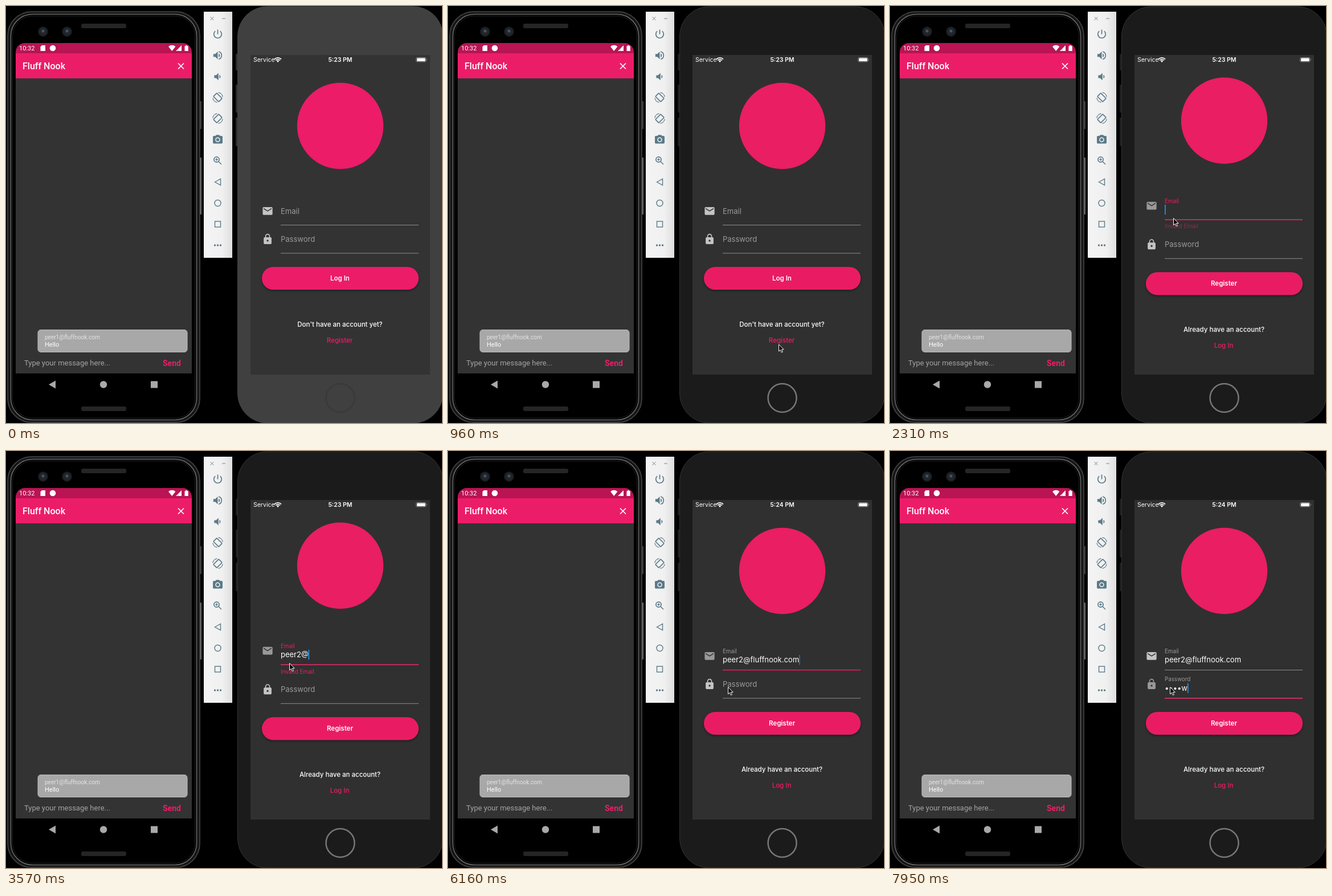
These frames come from a looping animation (765x732 px, 8 s). An HTML page:

```html
<!DOCTYPE html>
<html lang="en">
<head>
<meta charset="utf-8">
<title>Chat sign-up</title>
<style>
  html, body { margin: 0; width: 100%; height: 100%; overflow: hidden; background: #000; }
  svg { display: block; width: 765px; height: 732px; font-family: Roboto, sans-serif; }
  .ios {
    --shell: #1b1b1b; --edge: #333; --screen: #303030; --pink: #e91e63; --ring: #777; --key: #1d1d1d;
    font-family: Inter, sans-serif;
  }
  .ios.idle { --shell: #404040; --edge: #444; --screen: #333; --pink: #ec1c69; --ring: #393939; --key: #2c2c2c; }
  .pink { fill: var(--pink); }
  .screen { fill: var(--screen); }
  .mid { text-anchor: middle; }
  .small { font-size: 11.5px; }
  .field { font-size: 13px; }
  .label { fill: #9a9a9a; font-size: 13px; }
  .line { stroke: #8c8c8c; stroke-width: 1; }
  .focus { stroke: var(--pink); stroke-width: 1.6; opacity: 0; }
  .icon { fill: #c4c4c4; }
  .caret { fill: #2196f3; opacity: 0; }
  .tools { fill: #5c7a88; }
  .stroke { fill: none; stroke: #5c7a88; stroke-width: 1.7; }
</style>
</head>
<body>
<svg viewBox="0 0 765 732">
  <defs>
    <clipPath id="viewport"><rect x="429" y="86" width="315" height="561"/></clipPath>
    <linearGradient id="panel">
      <stop offset="0" stop-color="#f4f4f4"/><stop offset=".65" stop-color="#f0f0f0"/><stop offset="1" stop-color="#dedede"/>
    </linearGradient>
    <filter id="shadow" x="-5%" y="-20%" width="110%" height="150%">
      <feDropShadow dx="0" dy="2" stdDeviation="2" flood-opacity=".4"/>
    </filter>
    <path id="mail" d="M20 4H4a2 2 0 00-2 2v12a2 2 0 002 2h16a2 2 0 002-2V6a2 2 0 00-2-2zm0 4l-8 5-8-5V6l8 5 8-5z"/>
    <path id="lock" d="M18 8h-1V6a5 5 0 00-10 0v2H6a2 2 0 00-2 2v10a2 2 0 002 2h12a2 2 0 002-2V10a2 2 0 00-2-2zm-6 9a2 2 0 110-4 2 2 0 010 4zm3.1-9H8.9V6a3.1 3.1 0 016.2 0z"/>
    <g id="rotate">
      <rect x="-4.2" y="-6.6" width="8.4" height="13.2" rx="1" transform="rotate(-45)"/>
      <path d="M1 -8.6A8.6 8.6 0 0 1 8.6 -1M-1 8.6A8.6 8.6 0 0 1 -8.6 1" stroke-width="1.3"/>
    </g>
  </defs>
  <rect width="765" height="732"/>

  <!-- Android phone -->
  <rect x="340" y="167" width="3" height="49" rx="1" fill="#3b3b3b"/>
  <rect x="340" y="266" width="3" height="100" rx="1" fill="#666"/>
  <rect x="3" y="10" width="337" height="721" rx="42" fill="#161616" stroke="#4a4a4a" stroke-width="1.5"/>
  <rect x="8.5" y="14.5" width="326" height="712" rx="38" stroke="#6a6a6a" stroke-width="1.5"/>
  <rect x="11.5" y="17.5" width="320" height="706" rx="35" stroke="#222"/>
  <g fill="#252525">
    <rect x="132" y="31" width="79" height="8" rx="3"/>
    <rect x="132" y="703" width="79" height="8" rx="3"/>
  </g>
  <g fill="#20262b" stroke="#181a1c" stroke-width="2">
    <circle cx="65" cy="45" r="8"/><circle cx="107" cy="45" r="8"/>
  </g>
  <g fill="#465463"><circle cx="65" cy="44" r="2.5"/><circle cx="107" cy="44" r="2.5"/></g>
  <path d="M17 83V81a16 16 0 0116-16H310a16 16 0 0116 16v2z" fill="#b91454"/>
  <rect x="17" y="83" width="309" height="44" fill="#ec1d68"/>
  <rect x="17" y="127" width="309" height="518" fill="#333"/>
  <g fill="#fff">
    <text x="23" y="78" font-size="11">10:32</text>
    <path d="M63 69h6v10h-8.500V71.500z"/>
    <circle cx="82" cy="74" r="5.3"/>
    <path d="M285 71.300a9 9 0 0112.400 0L291.200 79zM308 69v10h-10zM313.500 70.200h1.800V69h2.600v1.200h1.800V79h-6.200z"/>
    <path d="M302 69v10" stroke="#b91454" opacity=".4"/>
    <text x="29" y="111" font-size="16" font-weight="500">Fluff Nook</text>
    <path d="M302 100.500l10 10M312 100.500l-10 10" stroke="#fff" stroke-width="1.7"/>
  </g>
  <rect x="56" y="568.500" width="262" height="39" rx="5" fill="#a8a8a8" stroke="#bdbdbd"/>
  <text x="68" y="585" font-size="10" fill="#e4e4e4">peer1@fluffnook.com</text>
  <text x="68" y="598" font-size="11" fill="#fff">Hello</text>
  <text x="32" y="631" font-size="13" fill="#a4a4a4">Type your message here...</text>
  <text x="275" y="632" font-size="14" font-weight="700" fill="#ec1d68">Send</text>
  <g fill="#a9a9a9">
    <path d="M75 664.500L87 657.500v14z"/><circle cx="171" cy="664.500" r="6.200"/><rect x="254" y="658.500" width="12" height="12"/>
  </g>

  <!-- Emulator toolbar -->
  <rect x="347" y="10" width="50" height="432" fill="url(#panel)"/>
  <path d="M358.500 19l6 6M364.500 19l-6 6M379 22h6" stroke="#78858b"/>
  <g class="tools">
    <path transform="translate(361.300 76.500) scale(.85)" d="M3 9v6h4l5 5V4L7 9zm13.500 3A4.500 4.500 0 0014 7.970v8.050A4.470 4.470 0 0016.500 12zM14 3.230v2.060a7 7 0 010 13.420v2.060a9 9 0 000-17.540z"/>
    <path transform="translate(361.300 114.200) scale(.82)" d="M5 9v6h4l5 5V4L9 9zM18.500 12A4.500 4.500 0 0016 7.970v8.050A4.500 4.500 0 0018.500 12z"/>
    <path transform="translate(361.300 224.500) scale(.85)" d="M9 2L7.170 4H4a2 2 0 00-2 2v12a2 2 0 002 2h16a2 2 0 002-2V6a2 2 0 00-2-2h-3.170L15 2zm3 15a5 5 0 110-10 5 5 0 010 10z"/>
    <circle cx="371.500" cy="234.700" r="2.700"/>
    <circle cx="366.500" cy="420" r="1.700"/><circle cx="371.500" cy="420" r="1.700"/><circle cx="376.500" cy="420" r="1.700"/>
  </g>
  <g class="stroke">
    <path d="M371.500 41.500v8M367.200 44.200a6.800 6.800 0 108.600 0"/>
    <use href="#rotate" transform="translate(371.500 160.500)"/>
    <use href="#rotate" transform="translate(371.500 197.500) scale(-1 1)"/>
    <circle cx="369.500" cy="269.500" r="4.600"/>
    <path d="M373 273l5 5M367.200 269.500h4.600M369.500 267.200v4.600" stroke-width="1.500"/>
    <path d="M366.500 309l10-5.500v11z" stroke-width="1.400"/>
    <circle cx="371.500" cy="346" r="5.500" stroke-width="1.400"/>
    <rect x="366.500" y="378" width="10" height="10" stroke-width="1.400"/>
  </g>

  <!-- iOS simulator -->
  <g class="ios" id="ios">
    <g style="fill:var(--key)">
      <rect x="403" y="84" width="5" height="29" rx="1"/><rect x="403" y="138" width="5" height="49" rx="1"/><rect x="403" y="196" width="5" height="50" rx="1"/>
    </g>
    <rect x="406.500" y="1" width="360" height="731" rx="52" style="fill:var(--shell);stroke:var(--edge)"/>
    <circle cx="586.500" cy="688" r="25" fill="none" stroke-width="2.500" style="stroke:var(--ring)"/>
    <g clip-path="url(#viewport)">
      <g id="login"></g>
      <g id="signup"></g>
      <circle id="logo" class="pink" cx="586.500" cy="210.500" r="75.700"/>
    </g>
    <g fill="#fff">
      <text x="434" y="98" font-size="10.500">Service</text>
      <path d="M471 93.300a8.500 8.500 0 0112 0M473.100 95.500a5.500 5.500 0 017.800 0" fill="none" stroke="#fff" stroke-width="1.700"/>
      <path d="M474.800 96.600a3.200 3.200 0 014.400 0L477 99z"/>
      <text id="clock" class="mid" x="586.500" y="98" font-size="10.500" font-weight="600"></text>
      <rect x="719.500" y="90.500" width="17.500" height="7.500" rx="2" fill="none" stroke="#999" stroke-width=".8"/>
      <rect x="721" y="91.500" width="14.700" height="5.500" rx="1"/><path d="M738.200 92.700q1.500 1.500 0 3z" fill="#aaa"/>
    </g>
  </g>
  <path id="cursor" d="M0 0V12.200l2.800-2.600 2 4.500 2-.9-2-4.300H8.600z" stroke="#fff"/>
</svg>
<script>
const $ = id => document.getElementById(id);
const LOOP = 8000, FRAME = 89.2, LEFT = 482;
const ADDRESS = 'peer2@fluffnook.com', SECRET = 'passw';
const EMAIL_KEYS = [2760, 2850, 2940, 3120, 3210, 3570, 4100, 4190, 4280, 4370, 4550, 4730, 4910, 5000, 5000, 5170, 5350, 5440, 5530];
const SECRET_KEYS = [7420, 7510, 7590, 7770, 7950];
const FOCUS_EMAIL = 1950, FOCUS_SECRET = 6520, ERROR_ON = 2220, ERROR_OFF = 5800, FADE = 200;

const fieldMarkup = (id, name, icon, y) => `
  <use id="${id}Icon" class="icon" href="#${icon}" transform="translate(448.700 ${y - 10.5}) scale(.86)"/>
  <text id="${id}Label" class="label" transform="translate(${LEFT} ${y + 4.5})">${name}</text>
  <text id="${id}Text" class="field" x="${LEFT}" y="${y + 11}" fill="#fff"></text>
  <rect id="${id}Caret" class="caret" y="${y - 2}" width="1.600" height="17.500"/>
  <path class="line" d="M${LEFT} ${y + 24.5}H724"/>
  <path id="${id}Focus" class="focus" d="M${LEFT} ${y + 24.5}H724"/>`;

const pageMarkup = (id, action, question, link) => `
  <rect class="screen" x="429" y="86" width="315" height="561"/>
  <g id="${id}Top">${fieldMarkup(id + 'Email', 'Email', 'mail', 360)}
    <text id="${id}Error" class="pink" x="${LEFT}" y="400.500" font-size="10" opacity="0">Invalid Email</text>
  </g>
  <g id="${id}Bottom">${fieldMarkup(id + 'Secret', 'Password', 'lock', 409.5)}
    <rect class="pink" x="449" y="458" width="275" height="40" rx="20" filter="url(#shadow)"/>
    <g class="mid small">
      <text x="586" y="482" fill="#fff" font-weight="600">${action}</text>
      <text x="586" y="563" fill="#fff" font-weight="500">${question}</text>
      <text class="pink" x="585.500" y="590.500" font-weight="500">${link}</text>
    </g>
  </g>`;

$('login').innerHTML = pageMarkup('login', 'Log In', "Don't have an account yet?", 'Register');
$('signup').innerHTML = pageMarkup('signup', 'Register', 'Already have an account?', 'Log In');

const ramp = (t, from, to) => Math.min(1, Math.max(0, (t - from) / (to - from)));
const smooth = x => x * x * (3 - 2 * x);
const mix = (a, b, x) => a + (b - a) * x;
const move = (id, x, y) => $(id).setAttribute('transform', `translate(${x} ${y})`);
const typed = (keys, t) => keys.filter(k => k <= t).length;

// Pointer legs: start, end, from, to
const LEGS = [
  [270, 900, [371, 612], [580.5, 594]],
  [1400, 1770, [580.5, 594], [497.5, 372.5]],
  [5850, 6150, [497.5, 372.5], [491.5, 414.5]]
];
function pointerAt(t) {
  const [start, end, a, b] = LEGS.filter(leg => t >= leg[0]).pop() || LEGS[0];
  const k = smooth(ramp(t, start, end));
  return [mix(a[0], b[0], k), mix(a[1], b[1], k)];
}

// The caret holds after each key, then fades out and back
function caretAlpha(t, since) {
  const age = t - since;
  return age < 1050 ? 1 - ramp(age, 550, 800) : ramp(age, 1050, 1300);
}

function drawField(id, y, t, focusAt, blurAt, keys, text) {
  const focused = t >= focusAt && t < blurAt;
  const lift = smooth(ramp(t, focusAt, focusAt + FADE));
  $(id + 'Label').setAttribute('transform',
    `translate(${LEFT} ${mix(y + 4.5, y - 5.2, lift)}) scale(${mix(1, .75, lift)})`);
  $(id + 'Focus').style.opacity = lift * (1 - ramp(t, blurAt, blurAt + FADE));
  $(id + 'Icon').style.fill = focused ? '#999' : '#c4c4c4';
  $(id + 'Text').textContent = text;
  const since = keys.filter(k => k <= t).pop() || focusAt;
  $(id + 'Caret').setAttribute('x', LEFT + $(id + 'Text').getComputedTextLength());
  $(id + 'Caret').style.opacity = focused ? caretAlpha(t, since) : 0;
}

function render(now) {
  const t = now % LOOP;
  const held = Math.floor(t / FRAME + .3) * FRAME;

  $('ios').classList.toggle('idle', t < 790);
  $('clock').textContent = t < 4550 ? '5:23 PM' : '5:24 PM';

  const slide = 1 - (1 - ramp(held, 1190, 1650)) ** 3;
  move('login', -105 * slide, 0);
  move('signup', 315 * (1 - slide), 0);

  const shift = held >= ERROR_ON && held < ERROR_OFF + FADE ? 9.3 : 0;
  move('logo', 0, -shift);
  move('signupTop', 0, -shift);
  move('signupBottom', 0, shift);

  const error = ramp(held, ERROR_ON - 40, ERROR_ON + FADE) * (1 - ramp(held, ERROR_OFF - 60, ERROR_OFF + FADE));
  $('signupError').setAttribute('opacity', error);
  move('signupError', 0, -3 * (1 - error));
  $('signupEmailLabel').style.fill = held >= ERROR_ON && t < ERROR_OFF ? 'var(--pink)' : '';

  const count = typed(SECRET_KEYS, t);
  const masked = count ? '•'.repeat(count - 1) + SECRET[count - 1] : '';
  drawField('signupEmail', 360, held + 5, FOCUS_EMAIL, FOCUS_SECRET, EMAIL_KEYS, ADDRESS.slice(0, typed(EMAIL_KEYS, t)));
  drawField('signupSecret', 409.5, held + 5, FOCUS_SECRET, LOOP + FRAME, SECRET_KEYS, masked);

  move('cursor', ...pointerAt(held));
  $('cursor').style.display = t < 350 ? 'none' : '';
}

const start = performance.now();
function tick() {
  render(performance.now() - start);
  requestAnimationFrame(tick);
}
tick();
</script>
</body>
</html>
```
